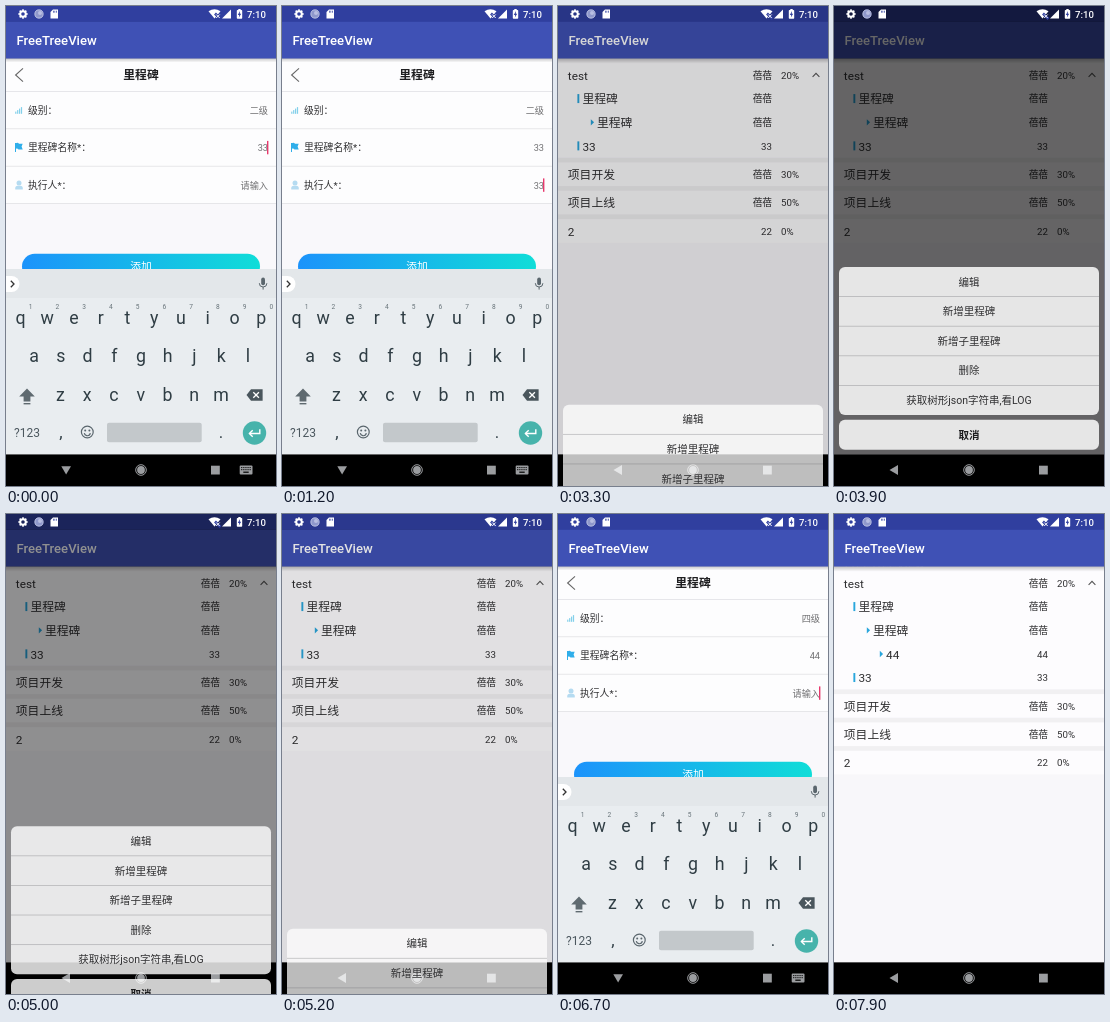
Recreate the animation shown at these times as an HTML page with a canvas. Size 270 by 480 pixels, loop 8000 ms.

```html
<!DOCTYPE html>
<html lang="zh">
<head>
<meta charset="utf-8">
<style>
html, body { margin: 0; width: 100%; height: 100%; overflow: hidden; background: #000; }
canvas { display: block; width: 270px; height: 480px; }
</style>
</head>
<body>
<canvas id="stage"></canvas>
<script>
const W = 270, H = 480, LOOP = 8000, STEP = 100;
const BAR = 15.8, TOP = 52.5, NAV = 448.5, KEYS = 263;
const FONT = 'Roboto, "Noto Sans CJK SC", "Noto Sans CJK", sans-serif';
const PERSON = '蓓蓓';
const INK = '#2f2f31', KEYINK = '#2f3d44', TINT = '#29a6dc';

const canvas = document.getElementById('stage');
const c = canvas.getContext('2d');
const ratio = window.devicePixelRatio || 1;
canvas.width = W * ratio;
canvas.height = H * ratio;

// helpers
const ramp = (t, a, b) => Math.min(1, Math.max(0, (t - a) / (b - a)));
const easeOut = p => 1 - (1 - p) * (1 - p);

function rect(x, y, w, h, fill) {
  c.fillStyle = fill;
  c.fillRect(x, y, w, h);
}

function round(x, y, w, h, r, fill) {
  c.fillStyle = fill;
  c.beginPath();
  c.roundRect(x, y, w, h, r);
  c.fill();
}

function disc(x, y, r, fill) {
  c.fillStyle = fill;
  c.beginPath();
  c.arc(x, y, r, 0, 7);
  c.fill();
}

function ring(x, y, r, color, width) {
  c.strokeStyle = color;
  c.lineWidth = width;
  c.beginPath();
  c.arc(x, y, r, 0, 7);
  c.stroke();
}

function trace(points) {
  c.beginPath();
  for (let i = 0; i < points.length; i += 2) c.lineTo(points[i], points[i + 1]);
}

function poly(fill, ...points) {
  trace(points);
  c.fillStyle = fill;
  c.fill();
}

function line(color, width, ...points) {
  trace(points);
  c.strokeStyle = color;
  c.lineWidth = width;
  c.stroke();
}

// y is the vertical middle of the text
function text(s, x, y, size, color, align = 'left', weight = 400) {
  c.font = `${weight} ${size}px ${FONT}`;
  c.textAlign = align;
  c.fillStyle = color;
  c.fillText(s, x, y + size * 0.37);
}

// app chrome
function appBar() {
  rect(0, 0, W, BAR, '#303f9f');
  rect(0, BAR, W, TOP - BAR, '#3f51b5');
  text('FreeTreeView', 10.5, 34.5, 13.1, '#fff', 'left', 500);
  const shade = c.createLinearGradient(0, TOP, 0, TOP + 4);
  shade.addColorStop(0, 'rgba(0,0,0,.2)');
  shade.addColorStop(1, 'rgba(0,0,0,0)');
  rect(0, TOP, W, 4, shade);
}

function statusIcons() {
  const white = '#fff';
  ring(17, 8, 2.8, white, 2);
  for (let i = 0; i < 8; i++) {
    const a = i * Math.PI / 4, x = Math.cos(a), y = Math.sin(a);
    line(white, 1.6, 17 + x * 3, 8 + y * 3, 17 + x * 4.7, 8 + y * 4.7);
  }
  disc(33, 8, 4.4, '#8f98cb');
  ring(33, 8, 4.1, '#c3c8e6', 0.8);
  disc(34, 7, 2, '#b9bfe2');
  poly(white, 47, 3.5, 52, 3.5, 52, 12.5, 44.5, 12.5, 44.5, 6);
  for (let i = 0; i < 3; i++) rect(47 + i * 1.5, 4.7, 0.7, 2, '#303f9f');
  c.fillStyle = white;
  c.beginPath();
  c.moveTo(208.5, 12.5);
  c.lineTo(202.5, 5.2);
  c.quadraticCurveTo(208.5, 1.5, 214.5, 5.2);
  c.fill();
  line('#303f9f', 2.6, 209, 7.5, 214.5, 13);
  line(white, 1, 210.2, 8.5, 213.7, 12);
  line(white, 1, 213.7, 8.5, 210.2, 12);
  poly(white, 225, 3.5, 225, 12.5, 216, 12.5);
  round(230.8, 4, 5.4, 8.8, 0.7, white);
  rect(232.3, 3, 2.4, 1.2, white);
  poly('#303f9f', 234, 5, 231.8, 8.9, 233.2, 8.9, 232.9, 11.6, 235.2, 7.7, 233.8, 7.7);
  text('7:10', 260, 8.3, 9.6, white, 'right', 500);
}

function navBar(keysUp) {
  const gray = '#9b9da0';
  rect(0, NAV, W, H - NAV, '#000');
  if (keysUp) {
    poly(gray, 55.3, 460.3, 65, 460.3, 60.1, 468.5);
    round(233.7, 459.5, 12.8, 9, 1, gray);
    for (let row = 0; row < 2; row++)
      for (let i = 0; i < 5; i++) rect(235.2 + i * 2.1, 461 + row * 2.1, 1.1, 1.1, '#000');
    rect(237.3, 465.6, 5.4, 1.2, '#000');
  } else {
    poly(gray, 55.5, 464, 64, 459, 64, 469);
  }
  ring(135, 464, 5.3, gray, 1);
  disc(135, 464, 3.9, gray);
  rect(205, 459.7, 8.8, 8.8, gray);
}

// tree page
function treePage(withNew) {
  rect(0, TOP, W, NAV - TOP, '#f8f7fa');
  const root = [
    ['test', PERSON, 0, '20%'],
    ['里程碑', PERSON, 1],
    ['里程碑', PERSON, 2],
    ['33', '33', 1]
  ];
  if (withNew) root.splice(3, 0, ['44', '44', 3]);
  const items = [
    root,
    [['项目开发', PERSON, 0, '30%']],
    [['项目上线', PERSON, 0, '50%']],
    [['2', '22', 0, '0%']]
  ];
  const gap = 4.7, rowH = 23.65;
  let y = TOP;
  for (const rows of items) {
    rect(0, y, W, gap, '#f1f0f2');
    y += gap;
    rect(0, y, W, rowH * rows.length, '#fdfcfe');
    for (const row of rows) {
      treeRow(row, y + rowH / 2);
      y += rowH;
    }
  }
  line('#555', 1.1, 254.6, 70.8, 258, 67.4, 261.4, 70.8);
  appBar();
}

function treeRow([name, person, level, percent], y) {
  const x = [9.8, 24.4, 39, 52][level];
  if (level === 1) rect(19.4, y - 4.6, 1.9, 9, TINT);
  if (level > 1) poly(TINT, x - 6.2, y - 3.2, x - 2.9, y, x - 6.2, y + 3.2);
  text(name, x, y + 0.3, 11.8, INK);
  text(person, 214, y + 0.2, 9.7, INK, 'right');
  if (percent) text(percent, 223, y + 0.2, 9.7, INK);
}

// form page
function formPage(s) {
  rect(0, TOP, W, NAV - TOP, '#f9f8fb');
  rect(0, TOP, W, 145, '#fdfdfe');
  for (const y of [85, 122.4, 159.8, 197.2]) rect(0, y, W, 0.8, '#e2e2e5');
  line('#666', 1.1, 17, 62.3, 9.6, 69, 17, 75.7);
  text('里程碑', 135, 69, 11.8, '#1f1f21', 'center', 700);

  for (let i = 0; i < 4; i++) rect(9.2 + i * 1.9, 105.6 - i * 1.5, 1.2, 2.2 + i * 1.5, '#83d0ea');
  rect(9, 137, 1, 9, '#2faeea');
  c.fillStyle = '#2faeea';
  c.beginPath();
  c.moveTo(9.5, 137.3);
  c.quadraticCurveTo(12, 136, 13, 137.8);
  c.lineTo(16.7, 137.8);
  c.lineTo(15.6, 140.6);
  c.lineTo(16.7, 143.5);
  c.lineTo(12.5, 143.5);
  c.quadraticCurveTo(11.5, 142, 9.5, 142.8);
  c.fill();
  disc(13, 177, 2.5, '#b5dbf1');
  round(9.2, 179.8, 7.6, 3.8, [2.5, 2.5, 0.5, 0.5], '#b5dbf1');

  const fields = [['级别：', s.level], ['里程碑名称*：', s.name], ['执行人*：', s.owner]];
  fields.forEach(([label, value], i) => {
    const y = 104 + i * 37.5;
    text(label, 22, y, 9.8, '#2f2f31');
    text(value || '请输入', 262, y + 0.1, 9.2, '#707072', 'right');
    if (s.cursor === i) rect(261, y - 6.6, 1.4, 13.4, '#e8386d');
  });

  const fade = c.createLinearGradient(16, 0, 254, 0);
  fade.addColorStop(0, '#1c93fb');
  fade.addColorStop(1, '#10ddd8');
  round(16, 247.8, 238, 25.4, 12.7, fade);
  text('添加', 135, 260.7, 10.8, '#fff', 'center');
  appBar();
}

function keyboard(pressed) {
  rect(0, KEYS, W, NAV - KEYS, '#e9edf0');
  rect(0, KEYS, W, 29, '#e3e7ea');
  round(-8, 270, 21.5, 16, 8, '#fff');
  line('#333', 1.3, 4.8, 274.8, 8, 278, 4.8, 281.2);

  const gray = '#5a666d';
  round(255.2, 271.6, 3.8, 7.6, 1.9, gray);
  c.strokeStyle = gray;
  c.lineWidth = 1;
  c.beginPath();
  c.arc(257.1, 277.2, 3.8, 0, Math.PI);
  c.stroke();
  rect(256.6, 281, 1, 2.6, gray);

  const step = 26.75;
  [['qwertyuiop', 14.5, 311], ['asdfghjkl', 28, 349.5], ['zxcvbnm', 54.5, 388]].forEach(([keys, x, y], row) => {
    [...keys].forEach((key, i) => {
      text(key, x + i * step, y, 17.8, KEYINK, 'center');
      if (!row) text(String((i + 1) % 10), x + 10 + i * step, 301, 6.6, '#68747a', 'center');
    });
  });

  poly('#5f6a70', 21, 382.5, 28.8, 390.5, 24.4, 390.5, 24.4, 395.5, 17.6, 395.5, 17.6, 390.5, 13.2, 390.5);
  rect(17.6, 397, 6.8, 1.4, '#5f6a70');
  poly('#4a565d', 240.5, 389, 245, 383.3, 256.6, 383.3, 256.6, 394.7, 245, 394.7);
  line('#fff', 1.3, 247.3, 386.2, 252.9, 391.8);
  line('#fff', 1.3, 252.9, 386.2, 247.3, 391.8);

  text('?123', 21, 426.5, 12, '#4b575e', 'center');
  text(',', 55, 426, 17, KEYINK, 'center');
  ring(81.3, 426, 5.9, gray, 1.2);
  disc(79.2, 424.4, 1, gray);
  disc(83.4, 424.4, 1, gray);
  c.beginPath();
  c.arc(81.3, 426.6, 3.1, 0.2, Math.PI - 0.2);
  c.stroke();
  round(101, 416.8, 94.7, 19.4, 2, '#c3c8cb');
  text('.', 215, 426, 17, KEYINK, 'center');
  disc(248.5, 427, 11.7, pressed ? '#3c968e' : '#47b3ab');
  line('#fff', 1.4, 253.8, 423.3, 253.8, 427.5, 243.5, 427.5);
  line('#fff', 1.4, 246.7, 424.2, 243.4, 427.5, 246.7, 430.8);
}

// action sheet
function sheet(p) {
  const y = 261 + (NAV - 261) * (1 - p), rowH = 29.6;
  const labels = ['编辑', '新增里程碑', '新增子里程碑', '删除', '获取树形json字符串,看LOG'];
  const fill = `rgba(255,255,255,${0.71 + 0.13 * p})`;
  round(5, y, 260, 148, 6, fill);
  labels.forEach((label, i) => {
    if (i) rect(5, y + i * rowH - 0.4, 260, 0.8, 'rgba(90,90,95,.35)');
    text(label, 135, y + (i + 0.5) * rowH, 10.5, '#303032', 'center');
  });
  round(5, y + 152.7, 260, 30, 6, fill);
  text('取消', 135, y + 167.8, 10.5, '#1c1c1e', 'center', 700);
}

// everything on screen follows from the time
function formState(t) {
  if (t < 3000) {
    const owner = t < 500 ? '' : t < 1000 ? '3' : '33';
    const cursor = t < 100 ? 1 : t < 300 || t >= 1000 ? 2 : -1;
    return { level: '二级', name: '33', owner, cursor };
  }
  const name = t < 6500 ? '' : t < 6600 ? '4' : '44';
  const owner = t < 7100 ? '' : t < 7400 ? '4' : '44';
  const cursor = t < 6200 ? -1 : t < 6700 ? 1 : 2;
  return { level: '四级', name, owner, cursor };
}

function draw(t) {
  const form = t < 3000 ? 1 - ramp(t, 1400, 1900) : ramp(t, 5300, 5800) - ramp(t, 7600, 7900);
  const keys = t < 3000 ? 1 - ramp(t, 1200, 1500) : ramp(t, 6100, 6500) - ramp(t, 7500, 7800);
  const menu = t < 4900 ? easeOut(ramp(t, 3200, 3900)) : 1 - ramp(t, 4900, 5266);

  c.setTransform(ratio, 0, 0, ratio, 0, 0);
  if (form < 1) treePage(t > 7000);
  if (form > 0) {
    c.save();
    c.globalAlpha = form;
    c.translate(0, 36 * (1 - easeOut(form)));
    formPage(formState(t));
    c.restore();
  }
  if (menu > 0) rect(0, 0, W, NAV, `rgba(0,0,0,${0.6 * menu})`);
  if (keys > 0) {
    c.save();
    c.translate(0, (NAV - KEYS) * (1 - easeOut(keys)));
    keyboard((t >= 100 && t < 300) || (t >= 6700 && t < 6700 + STEP && keys < 1));
    c.restore();
  }
  navBar(keys > 0);
  if (menu > 0) sheet(menu);
  statusIcons();
}

function tick() {
  const t = performance.now() % LOOP;
  draw(Math.floor(t / STEP) * STEP);
  requestAnimationFrame(tick);
}
tick();
</script>
</body>
</html>
```
